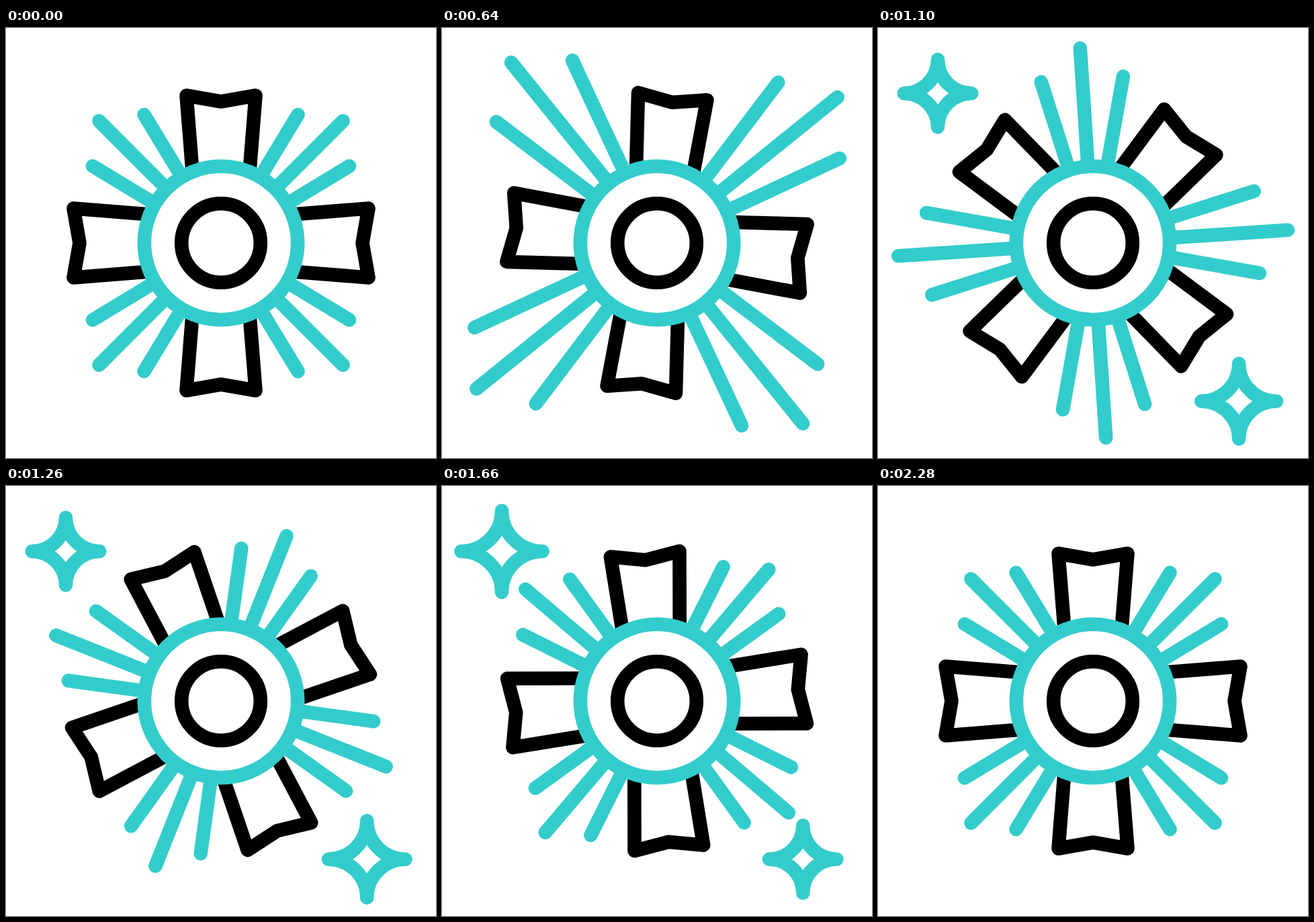
These frames come from a looping animation (640x640 px, 2400 ms). An HTML page:

```html
<!DOCTYPE html>
<html>
<head>
<meta charset="utf-8">
<style>
  html, body { margin: 0; width: 100%; height: 100%; overflow: hidden; background: #fff; }
  svg { display: block; width: 100vw; height: 100vh; }
</style>
</head>
<body>
<svg viewBox="0 0 640 640" fill="none" stroke-width="20.6" stroke-linecap="round" stroke-linejoin="round">
  <defs>
    <g id="quarter">
      <path stroke="#000" d="M-42-100L-51.5-219.5L0-210.5L51.5-219.5L42-100"/>
      <path class="rays" stroke="#3cc"/>
    </g>
  </defs>
  <g id="cross">
    <use href="#quarter"/>
    <use href="#quarter" transform="rotate(90)"/>
    <use href="#quarter" transform="rotate(180)"/>
    <use href="#quarter" transform="rotate(270)"/>
  </g>
  <g transform="translate(320 320)">
    <circle r="114.2" fill="#fff" stroke="#3cc"/>
    <circle r="58.8" stroke="#000"/>
  </g>
  <path class="star" stroke="#3cc" transform="translate(89 97.3)"/>
  <path class="star" stroke="#3cc" transform="translate(537.2 555.5)"/>
</svg>
<script>
const LOOP = 2400, SPIN = 2240;
const cross = document.getElementById('cross');
const rays = document.querySelector('.rays');
const stars = document.querySelectorAll('.star');
const starStarts = [648, 912];

const rayKeys = [[0, 1], [705, 1.353], [1380, 1]];
const starKeys = [[0, 0], [255, 67], [425, 50.25], [880, 50.25], [1110, 67], [1368, 0]];
// Inner end and outer end of each ray in one corner
const rayEnds = [[-60, -101, -114.5, -191], [-74, -74, -181.6, -181.6], [-101, -60, -191, -114.5]];

const smooth = u => u * u * (3 - 2 * u);

function track(keys, t) {
  const i = keys.findIndex(k => k[0] > t);
  if (i < 0) return keys[keys.length - 1][1];
  if (i === 0) return keys[0][1];
  const [t0, a] = keys[i - 1], [t1, b] = keys[i];
  return a + (b - a) * smooth((t - t0) / (t1 - t0));
}

// cubic-bezier(.8, 0, .2, 1)
function sharpEase(x) {
  let lo = 0, hi = 1;
  for (let i = 0; i < 30; i++) {
    const s = (lo + hi) / 2, r = 1 - s;
    if (2.4 * s * r * r + 0.6 * s * s * r + s * s * s < x) lo = s;
    else hi = s;
  }
  return smooth(lo);
}

function starPath(size) {
  const arc = (x, y) => `A${size} ${size} 0 0 0 ${x * size} ${y * size}`;
  return `M0 ${-size}${arc(1, 0)}${arc(0, 1)}${arc(-1, 0)}${arc(0, -1)}Z`;
}

function draw(now) {
  const t = now % LOOP;
  const angle = 90 * sharpEase(Math.min(t / SPIN, 1));
  cross.setAttribute('transform', `translate(320 320) rotate(${angle})`);

  const reach = track(rayKeys, t);
  rays.setAttribute('d', rayEnds.map(([x, y, tipX, tipY]) =>
    `M${x} ${y}L${tipX * reach} ${tipY * reach}`).join(''));

  stars.forEach((star, i) => {
    const size = track(starKeys, t - starStarts[i]);
    star.setAttribute('d', size > 0 ? starPath(size) : '');
  });
}

const start = performance.now();
function tick() {
  draw(performance.now() - start);
  requestAnimationFrame(tick);
}
tick();
</script>
</body>
</html>
```
